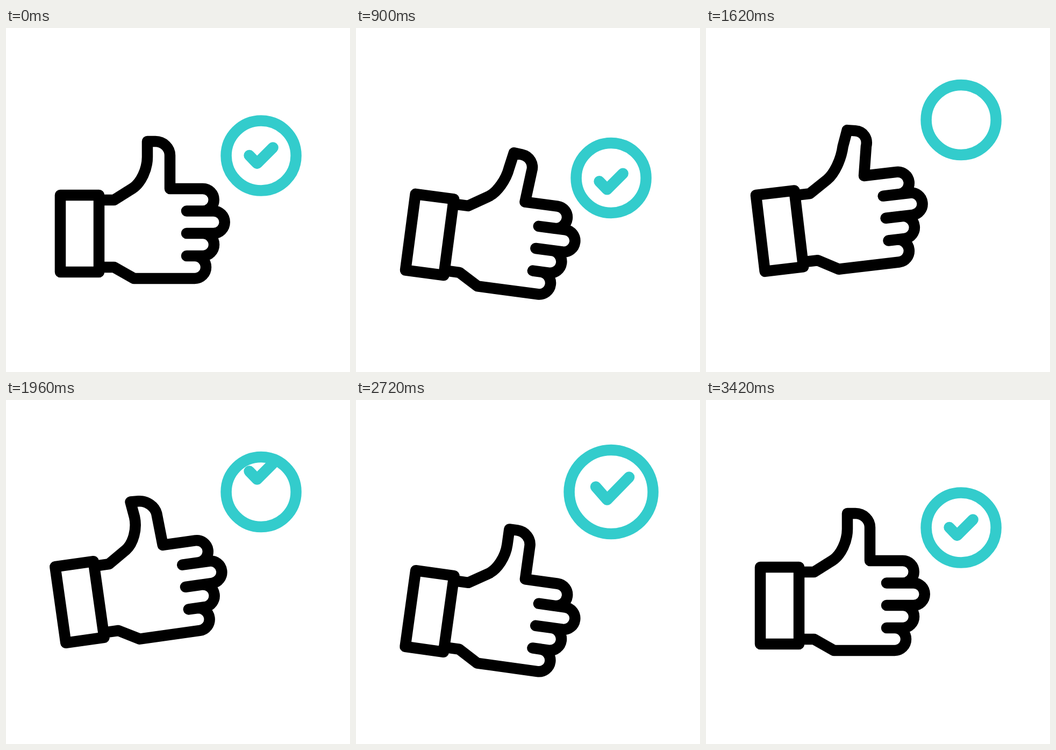
These frames come from a looping animation (640 by 640 pixels, 3.6 s). An HTML page:

```html
<!DOCTYPE html>
<html lang="en">
<head>
<meta charset="utf-8">
<title>Thumbs up</title>
<style>
  html, body { margin: 0; width: 100%; height: 100%; overflow: hidden; background: #fff; }
  svg { display: block; width: 100vw; height: 100vh; }
  path, circle { fill: none; stroke-width: 20.5; stroke-linecap: round; stroke-linejoin: round; }
  #hand { stroke: #000; }
  #badge { stroke: #3cc; }
</style>
</head>
<body>
<svg viewBox="0 0 640 640">
  <defs><clipPath id="disc"><circle id="hole" r="65"/></clipPath></defs>
  <g id="hand">
    <path d="M101 311H173V454H101Z"/>
    <path id="palm"/>
  </g>
  <g id="badge">
    <g clip-path="url(#disc)"><path id="check"/></g>
    <circle id="ring" r="65"/>
  </g>
</svg>
<script>
const LOOP = 3600;
const $ = id => document.getElementById(id);

const smooth = u => u * u * (3 - 2 * u);
const settle = u => 1 - (1 - u) ** 1.5;

// Eased change from value a to value b between two times.
function move(t, t0, t1, a, b, ease = smooth) {
  return a + (b - a) * ease(Math.min(1, Math.max(0, (t - t0) / (t1 - t0))));
}

// The hand swings up smoothly and springs back faster from each low point.
function tilt(t) {
  if (t < 590) return move(t, 0, 590, 0, -8);
  if (t < 1065) return move(t, 590, 1065, -8, 13.4);
  if (t < 1960) return move(t, 1065, 1720, 13.4, -8, settle);
  if (t < 2480) return move(t, 1960, 2480, -8, 14);
  return move(t, 2480, 3240, 14, 0, settle);
}

function lift(t) {
  if (t < 590) return move(t, 0, 590, 0, -7.6);
  if (t < 1200) return move(t, 590, 1200, -7.6, 11);
  if (t < 1960) return move(t, 1200, 1720, 11, -6.5);
  if (t < 2700) return move(t, 1960, 2480, -6.5, 10.5);
  return move(t, 2700, 3240, 10.5, 0);
}

function bend(t) {
  if (t < 1350) return move(t, 640, 1350, 0, .36);
  if (t < 2260) return move(t, 1350, 2260, .36, -.22);
  return move(t, 2260, 2600, -.22, 0);
}

function drop(t) {
  if (t < 690) return move(t, 0, 690, 237.5, 310);
  if (t < 2740) return move(t, 690, 1380, 310, 171);
  return move(t, 2740, 3420, 171, 237.5);
}

// The check slips out below the ring and comes back in from above.
function slide(t) {
  if (t < 620) return move(t, 0, 620, 0, -13.5);
  if (t < 1640) return move(t, 620, 1640, -13.5, 96);
  if (t < 2230) return move(t, 1640, 2230, -96, 6.5);
  return move(t, 2260, 2720, 6.5, 0);
}

const grow = t => t < 2730 ? move(t, 2260, 2730, 0, 1) : move(t, 2730, 3230, 1, 0);

function palm(a) {
  // Thumb points lean more toward the tip; its right side sags a little.
  const p = (x, y) => [x + a * (299 - y) ** 2 / 88, y + .8 * Math.abs(a) * Math.max(0, x - 263)];
  return `M173 320H201L236 298C${p(251, 288)} ${p(263, 263)} ${p(263, 240)}
    L${p(263, 211)}L${p(278, 211)}C${p(293, 211)} ${p(305, 223)} ${p(305, 237)}L305 299
    H366A20.7 20.7 0 0 1 366 340.5H336H386A20.7 20.7 0 0 1 386 382H336
    H366A20.7 20.7 0 0 1 366 424H336H351A20.7 20.7 0 0 1 351 466H238L201 445H173`;
}

function draw(now) {
  const t = now % LOOP, g = grow(t), y = slide(t);
  $('hand').setAttribute('transform', `translate(0 ${lift(t)}) rotate(${tilt(t)} 137 382.5)`);
  $('palm').setAttribute('d', palm(bend(t)));
  $('badge').setAttribute('transform', `translate(474.6 ${drop(t)})`);
  for (const id of ['ring', 'hole']) $(id).setAttribute('r', 65 + 13 * g);
  $('check').setAttribute('d',
    `M${-22 - 6.5 * g} ${y - .5 - 9 * g}L-7.5 ${y + 14.5}L${22 + 11.5 * g} ${y - 15 - 12.5 * g}`);
  requestAnimationFrame(() => draw(performance.now() - start));
}

const start = performance.now();
draw(0);
</script>
</body>
</html>
```
